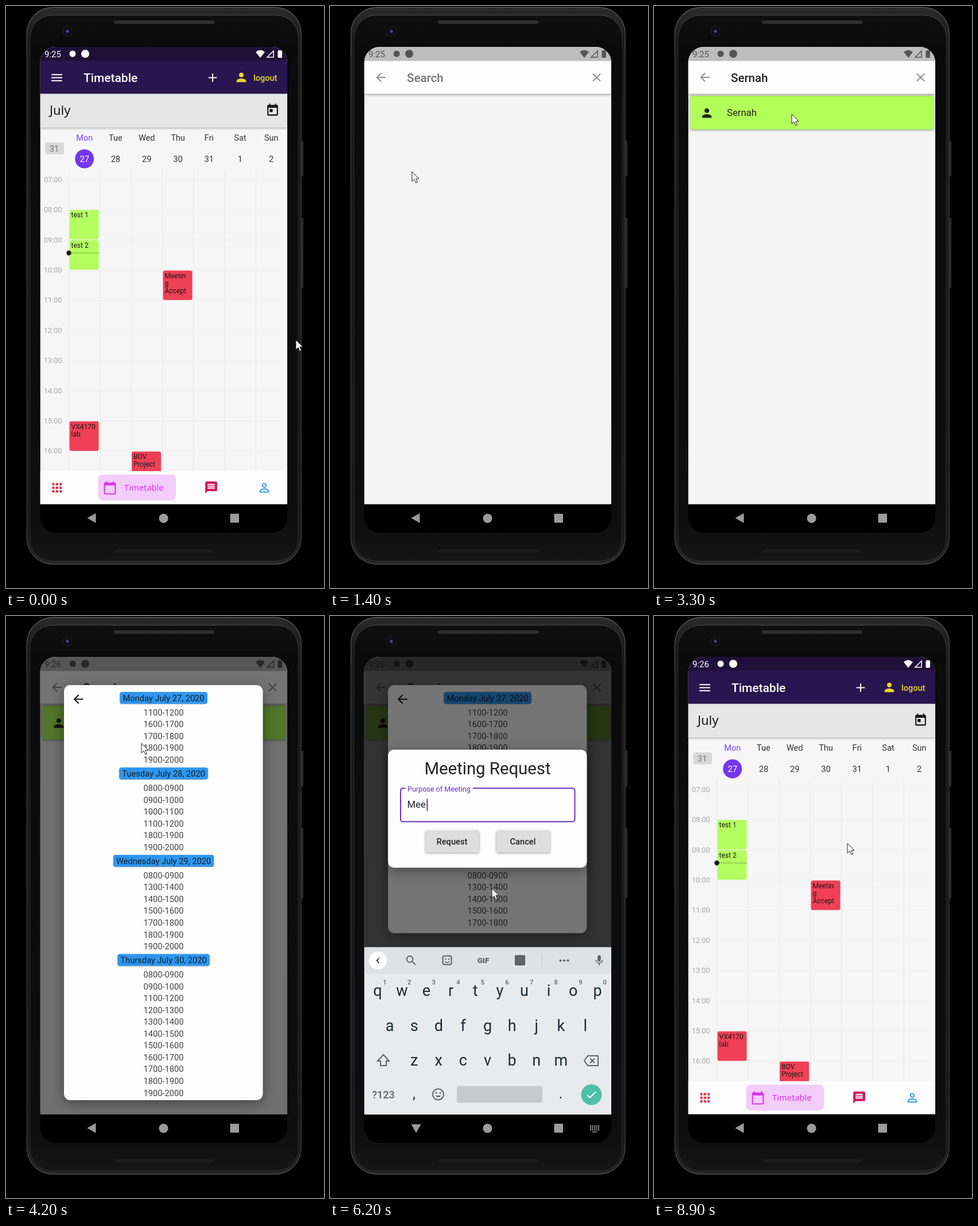
Animation, 554 px wide and 1011 px high, one loop 9 s. Source, as an HTML page with a canvas:

```html
<!DOCTYPE html>
<html lang="en">
<head>
<meta charset="utf-8">
<title>Planner app</title>
<style>
html, body { margin: 0; width: 100%; height: 100%; overflow: hidden; background: #000; }
canvas { display: block; }
</style>
</head>
<body>
<canvas id="stage" width="554" height="1011"></canvas>
<script>
const ctx = document.getElementById('stage').getContext('2d');
const LOOP = 9000, STEP = 100;
const LEFT = 59.5, TOP = 71, WIDTH = 430.5, NAV_TOP = 865.5, MID = 274.5;
const SCRIM = 'rgba(0,0,0,.54)';
let t = 0;

const ICONS = {
  menu: 'M3 18h18v-2H3zm0-5h18v-2H3zm0-7v2h18V6z',
  add: 'M19 13h-6v6h-2v-6H5v-2h6V5h2v6h6z',
  person: 'M12 12c2.2 0 4-1.8 4-4s-1.8-4-4-4-4 1.8-4 4 1.8 4 4 4zm0 2c-2.7 0-8 1.3-8 4v2h16v-2c0-2.7-5.3-4-8-4z',
  personLine: 'M12 5.9a2.1 2.1 0 1 1 0 4.2 2.1 2.1 0 0 1 0-4.2m0 9c3 0 6.1 1.5 6.1 2.1v1.1H5.9V17c0-.6 3.1-2.1 6.1-2.1M12 4a4 4 0 1 0 0 8 4 4 0 0 0 0-8zm0 9c-2.7 0-8 1.3-8 4v3h16v-3c0-2.7-5.3-4-8-4z',
  today: 'M19 3h-1V1h-2v2H8V1H6v2H5a2 2 0 0 0-2 2v14c0 1.1.9 2 2 2h14a2 2 0 0 0 2-2V5a2 2 0 0 0-2-2zm0 16H5V8h14zM7 10h5v5H7z',
  event: 'M19 3h-1V1h-2v2H8V1H6v2H5a2 2 0 0 0-2 2v14c0 1.1.9 2 2 2h14a2 2 0 0 0 2-2V5a2 2 0 0 0-2-2zm0 16H5V8h14zM12 12h5v5h-5z',
  calendar: 'M20 3h-1V1h-2v2H7V1H5v2H4a2 2 0 0 0-2 2v16c0 1.1.9 2 2 2h16a2 2 0 0 0 2-2V5a2 2 0 0 0-2-2zm0 18H4V8h16z',
  people: 'M16 11a3 3 0 1 0-3-3 3 3 0 0 0 3 3zm-8 0a3 3 0 1 0-3-3 3 3 0 0 0 3 3zm0 2c-2.3 0-7 1.2-7 3.5V19h14v-2.5C15 14.2 10.3 13 8 13zm8 0l-1 .05c1.2.8 2 2 2 3.45V19h6v-2.5c0-2.3-4.7-3.5-7-3.5z',
  bell: 'M12 22a2 2 0 0 0 2-2h-4c0 1.1.9 2 2 2zm6-6v-5c0-3.1-1.6-5.6-4.5-6.3V4a1.5 1.5 0 0 0-3 0v.7C7.6 5.4 6 7.9 6 11v5l-2 2v1h16v-1z',
  review: 'M20 2H4a2 2 0 0 0-2 2v18l4-4h14a2 2 0 0 0 2-2V4a2 2 0 0 0-2-2zM6 14v-2.5L13.2 4.5l2.3 2.3L8.5 14zm12 0h-7.5l2-2H18z',
  chat: 'M20 2H4a2 2 0 0 0-2 2v18l4-4h14a2 2 0 0 0 2-2V4a2 2 0 0 0-2-2zm-2 12H6v-2h12zm0-3H6V9h12zm0-3H6V6h12z',
  back: 'M20 11H7.8l5.6-5.6L12 4l-8 8 8 8 1.4-1.4L7.8 13H20z',
  close: 'M19 6.4L17.6 5 12 10.6 6.4 5 5 6.4l5.6 5.6L5 17.6 6.4 19l5.6-5.6 5.6 5.6 1.4-1.4-5.6-5.6z',
  search: 'M15.5 14h-.8l-.3-.3a6.5 6.5 0 1 0-.7.7l.3.3v.8l5 5 1.5-1.5zm-6 0a4.5 4.5 0 1 1 0-9 4.5 4.5 0 0 1 0 9z',
  mic: 'M12 14a3 3 0 0 0 3-3V5a3 3 0 0 0-6 0v6a3 3 0 0 0 3 3zm5.3-3a5.3 5.3 0 0 1-10.6 0H5c0 3.4 2.7 6.2 6 6.7V21h2v-3.3c3.3-.5 6-3.3 6-6.7z',
  check: 'M9 16.2L4.8 12l-1.4 1.4L9 19 21 7l-1.4-1.4z',
  chevron: 'M15.4 7.4L14 6l-6 6 6 6 1.4-1.4L10.8 12z'
};

const ramp = (from, to) => {
  const u = Math.min(1, Math.max(0, (t - from) / (to - from)));
  return u * u * (3 - 2 * u);
};
const during = (from, to) => t >= from && t < to;
const typed = (word, start, gap) => word.slice(0, Math.max(0, Math.floor((t - start) / gap) + 1));

function rect(x, y, w, h, color, radius = 0, blur = 0) {
  ctx.save();
  if (blur) { ctx.shadowColor = 'rgba(0,0,0,.4)'; ctx.shadowBlur = blur; ctx.shadowOffsetY = blur / 4; }
  ctx.fillStyle = color;
  ctx.beginPath();
  ctx.roundRect(x, y, w, h, radius);
  ctx.fill();
  ctx.restore();
}
function frame(x, y, w, h, color, radius, width = 1) {
  ctx.strokeStyle = color;
  ctx.lineWidth = width;
  ctx.beginPath();
  ctx.roundRect(x, y, w, h, radius);
  ctx.stroke();
}
function disc(x, y, r, color) {
  ctx.fillStyle = color;
  ctx.beginPath();
  ctx.arc(x, y, r, 0, 7);
  ctx.fill();
}
function ring(x, y, r, color, width, dash = []) {
  ctx.strokeStyle = color;
  ctx.lineWidth = width;
  ctx.setLineDash(dash);
  ctx.beginPath();
  ctx.arc(x, y, r, 0, 2 * Math.PI);
  ctx.stroke();
  ctx.setLineDash([]);
}
function shape(path, x, y, fill, stroke, width = 1.5) {
  ctx.save();
  ctx.translate(x, y);
  const p = new Path2D(path);
  if (fill) { ctx.fillStyle = fill; ctx.fill(p); }
  if (stroke) { ctx.strokeStyle = stroke; ctx.lineWidth = width; ctx.stroke(p); }
  ctx.restore();
}
function icon(name, x, y, color, size = 25) {
  ctx.save();
  ctx.translate(x - size / 2, y - size / 2);
  ctx.scale(size / 24, size / 24);
  ctx.fillStyle = color;
  ctx.fill(new Path2D(ICONS[name]), 'evenodd');
  ctx.restore();
}
function text(str, x, y, size, color, align = 'left', weight = 400, family = 'Roboto') {
  ctx.font = `${weight} ${size}px "${family}", sans-serif`;
  ctx.textAlign = align;
  ctx.fillStyle = color;
  ctx.fillText(str, x, y);
}
function vertical(...colors) {
  const gradient = ctx.createLinearGradient(0, 0, 0, 970);
  for (const [stop, color] of colors) gradient.addColorStop(stop, color);
  return gradient;
}
const scrim = () => rect(LEFT, TOP, WIDTH, NAV_TOP - TOP, SCRIM);

function drawPhone() {
  rect(0, 0, 554, 1011, '#000');
  for (const [y, h] of [[234, 62], [368, 122]]) rect(514, y, 4, h, '#2c2c2c', 1);
  rect(35.5, 1.5, 479.5, 969, vertical([0, '#2b2b2b'], [.06, '#1b1b1b'], [.94, '#191919'], [1, '#262626']), 46);
  frame(36.5, 2.5, 477.5, 967, vertical([0, '#6a6a6a'], [.1, '#454545'], [.9, '#3c3c3c'], [1, '#585858']), 45);
  rect(42, 16, 467, 948, vertical([0, '#101010'], [.08, '#0a0a0a'], [.92, '#0e0e0e'], [1, '#161616']), 38);
  frame(42, 16, 467, 948, vertical([0, '#555'], [.08, '#242424'], [1, '#2a2a2a']), 38);
  rect(188, 25, 175, 6, '#303030', 3);
  rect(189, 944, 173, 5, '#1c1c1c', 2);
  disc(107, 44, 9, '#1a1a1c');
  disc(107, 44, 7, '#08080b');
  disc(107, 44, 4.5, '#18163a');
  disc(107, 44, 2, '#5451a0');
}

function drawStatus(color) {
  text(t < 3500 ? '9:25' : '9:26', 67, 89, 15, color);
  disc(116, 83, 5.5, color);
  disc(138, 83, 7, color);
  shape('M435 80Q443 73 451 80L443 90Z', 0, 0, color);
  shape('M455 89L466 78V89Z', 0, 0, null, color);
  rect(473.5, 77, 7.5, 13, color, 1.5);
}

function drawEvent(x, y, color, lines) {
  rect(x, y, 51, 51.3, color, 3);
  lines.forEach((line, i) => text(line, x + 3, y + 13 + i * 13.2, 12, '#1a1a1a'));
}

function drawTimetable() {
  rect(LEFT, TOP, WIDTH, 795, '#f6f6f6');
  const column = i => 109 + i * 54.3, hourY = i => 301.3 + i * 52.4;
  for (let i = 0; i < 10; i++) {
    rect(104, hourY(i), 374, 1, '#eee');
    text(String(i + 7).padStart(2, '0') + ':00', 66, hourY(i) + 4.5, 12.57, '#a6a6a6');
  }
  for (let i = 0; i < 7; i++) rect(column(i), 285, 1, 523, '#ececec');
  disc(136.7, 265.5, 16.5, '#7436ef');
  'Mon Tue Wed Thu Fri Sat Sun'.split(' ').forEach((day, i) => {
    const x = 136.7 + i * 54.25;
    text(day, x, 234, 14.5, i ? '#333' : '#7c43f0', 'center');
    text(i < 5 ? 27 + i : i - 4, x, 271, 14.67, i ? '#333' : '#fff', 'center');
  });
  rect(68, 237, 33, 20.5, '#d8d8d8', 2);
  text('31', 84, 252.5, 14.67, '#777', 'center');

  drawEvent(110.5, 354.3, '#b4fc60', ['test 1']);
  drawEvent(110.5, 406.8, '#b4fc60', ['test 2']);
  drawEvent(273.5, 459.5, '#ef4056', ['Meetin', 'g', 'Accept']);
  drawEvent(110.5, 721.5, '#ef4056', ['VX4170', 'lab']);
  drawEvent(219, 774, '#ef4056', ['BOV', 'Project']);
  rect(110, 428.5, 53, 1, 'rgba(0,0,0,.3)');
  disc(109.5, 429, 4.2, '#151515');

  rect(LEFT, 152, WIDTH, 59, '#e6e6e6', 0, 5);
  text('July', 76, 189, 22, '#1c1c1c', 'left', 400, 'Noto Sans');
  icon('today', 464.5, 181, '#111');
  rect(LEFT, TOP, WIDTH, 24.5, '#201038');
  rect(LEFT, 95, WIDTH, 57.5, '#29154f');
  icon('menu', 88.5, 124.5, '#fff');
  text('Timetable', 135, 132, 20.95, '#fff', 'left', 500);
  icon('add', 360, 124.5, '#fff');
  icon('person', 410, 124, '#e6d72b');
  text('logout', 431, 129.5, 14.5, '#e6d72b', 'left', 500);

  rect(LEFT, 808, WIDTH, 58, '#fdfdfd');
  for (let i = 0; i < 9; i++) rect(80.5 + i % 3 * 6.3, 828.5 + Math.floor(i / 3) * 6.3, 4.2, 4.2, '#df3a4b');
  rect(160.5, 814, 135.5, 45, '#f2cdfa', 8);
  icon('calendar', 181, 837, '#d537ee');
  text('Timetable', 206, 842, 14.67, '#d537ee', 'left', 400, 'Noto Sans');
  icon('chat', 357.5, 836.5, '#d0185f');
  icon('personLine', 450, 837, '#3b9bdd');
}

function drawDrawer(open) {
  if (open <= 0) return;
  ctx.save();
  ctx.globalAlpha = open;
  scrim();
  ctx.globalAlpha = 1;
  ctx.translate(-316 * (1 - open), 0);
  rect(LEFT, TOP, 316, 795, '#f5f5f5', 0, 18);
  rect(LEFT, TOP, 316, 24.5, '#bababa');
  rect(LEFT, 95.5, 316, 165, '#f6a945');
  disc(217, 181, 54, '#5b0ae0');
  ['Meet', 'Notifications', 'Review', 'Events', 'Settings'].forEach((label, i) => {
    const y = 295 + i * 51.3;
    const name = ['people', 'bell', 'review', 'event'][i];
    if (name) icon(name, 78, y, '#1d1d1d');
    else {
      ring(78, y, 6, '#1d1d1d', 4.5);
      ring(78, y, 9, '#1d1d1d', 3, [4.7, 4.725]);
    }
    text(label, 111, y + 7.5, 20.95, '#222');
  });
  text('0', 335, 354, 20.95, '#b0123c');
  ctx.restore();
}

function drawSearch() {
  rect(LEFT, TOP, WIDTH, 795, '#f5f5f5');
  if (t >= 3000) {
    rect(63.5, 156, 423.5, 58.5, '#b2ff59', 3, 4);
    icon('person', 92, 186, '#222');
    text('Sernah', 127, 191, 16.76, '#222');
  }
  rect(LEFT, 95, WIDTH, 57.5, '#fefefe', 0, 5);
  rect(LEFT, TOP, WIDTH, 24.5, '#bdbdbd');
  icon('back', 88.5, 124, '#919191');
  icon('close', 464.5, 124, '#919191');
  const query = typed('Sernah', 2200, 120);
  text(query || 'Search', 134, 132, 20.5, query ? '#222' : '#757575', 'left', 500);
  drawStatus('#555');
}

const AGENDA = [
  ['Monday July 27, 2020', [11, 16, 17, 18, 19]],
  ['Tuesday July 28, 2020', [8, 9, 10, 11, 18, 19]],
  ['Wednesday July 29, 2020', [8, 13, 14, 15, 17, 18, 19]],
  ['Thursday July 30, 2020', [8, 9, 11, 12, 13, 14, 15, 16, 17, 18, 19]]
];
const clock = hour => String(hour).padStart(2, '0') + '00';

function drawAgenda(keyboard) {
  const height = 721 - 290 * keyboard;
  rect(101, 120, 346.5, height, '#fdfdfd', 11, 22);
  ctx.save();
  ctx.beginPath();
  ctx.rect(101, 120, 346.5, height - 7);
  ctx.clip();
  icon('back', 126, 144.5, '#111');
  let y = 142.5;
  for (const [day, hours] of AGENDA) {
    ctx.font = '400 14.67px "Roboto", sans-serif';
    const w = ctx.measureText(day).width + 10;
    rect(MID - w / 2, y - 10.5, w, 20.5, '#2d96ee', 4, 2);
    text(day, MID, y + 5.3, 14.67, '#10202e', 'center');
    y += 25;
    for (const hour of hours) {
      text(`${clock(hour)}-${clock(hour + 1)}`, MID, y + 5.3, 14.67, '#444', 'center');
      y += 20.55;
    }
    y += 3.45;
  }
  ctx.restore();
}

function drawRequest(keyboard) {
  ctx.save();
  ctx.translate(0, -145.2 * keyboard);
  rect(101, 377.5, 346.5, 205, '#fdfdfd', 10, 22);
  text('Meeting Request', MID, 420, 29.33, '#222', 'center');
  const focused = t >= 5500;
  if (focused) {
    frame(123, 444.5, 303.5, 58, '#6a30c8', 4, 2);
    rect(131, 441, 118, 6, '#fdfdfd');
    text('Purpose of Meeting', 135, 450, 12.57, '#6a30c8');
    const message = typed('Meeting up?', 6000, 85);
    text(message, 134.5, 478.5, 16.76, '#222');
    if (during(5500, 7600) && t % 1000 < 500) {
      rect(136 + ctx.measureText(message).width, 463, 2, 21, '#6a30c8');
    }
  } else {
    frame(122.5, 444, 304.5, 59.5, '#9a9a9a', 4);
    text('Purpose of Meeting', 134.5, 479.5, 16.76, '#777');
  }
  const pressed = during(7600, 7900);
  rect(166.5, 518.5, 93, 37.5, pressed ? '#d2d2d2' : '#dedede', 2, pressed ? 8 : 4);
  if (pressed) {
    ctx.save();
    ctx.beginPath();
    ctx.rect(166.5, 518.5, 93, 37.5);
    ctx.clip();
    disc(240, 538, 21, '#bdbdbd');
    ctx.restore();
  }
  rect(290, 518.5, 93, 37.5, '#dedede', 2, 4);
  text('Request', 212.5, 542, 14.67, '#222', 'center', 500);
  text('Cancel', 336, 542, 14.67, '#222', 'center', 500);
  ctx.restore();
}

function drawKeyboard(open, action) {
  if (open <= 0) return;
  const gray = '#5f6368', ink = '#1c2c35', pitch = 42.6;
  ctx.save();
  ctx.beginPath();
  ctx.rect(LEFT, TOP, WIDTH, 796.5);
  ctx.clip();
  ctx.translate(0, 291 * (1 - open));
  rect(LEFT, 575.5, WIDTH, 290.5, '#e8eaee');
  rect(LEFT, 575.5, WIDTH, 46, '#dfe1e5');
  disc(83.5, 598.5, 15.5, '#fff');
  icon('chevron', 83.5, 598.5, '#333', 20);
  icon('search', 141.5, 598.5, gray, 23);
  frame(196.5, 590.5, 15, 15, gray, 3, 2);
  disc(201.5, 596, 1.3, gray);
  disc(207, 596, 1.3, gray);
  shape('M-4 0Q0 4 4 0', 204, 600, null, gray);
  text('GIF', 267, 603, 13.5, gray, 'center', 900);
  rect(322, 589, 18, 18, gray, 2);
  rect(369, 587, 1, 22, '#c8cbd0');
  for (let i = -1; i < 2; i++) disc(408 + i * 6.5, 598.5, 2, gray);
  icon('mic', 469, 598.5, gray, 22);

  const row = (letters, y) => [...letters].forEach((c, i) =>
    text(c, MID + (i - (letters.length - 1) / 2) * pitch, y, 27, ink, 'center'));
  row('qwertyuiop', 660);
  row('asdfghjkl', 720.5);
  row('zxcvbnm', 781);
  for (let i = 0; i < 10; i++) text((i + 1) % 10, 95.5 + i * pitch, 640, 11, gray, 'center', 500);
  shape('M0-10L10 1H5V9H-5V1H-10Z', 93, 772, null, gray, 2);
  shape('M-13 0L-7-8.5H11V8.5H-7ZM-3-4L5 4M5-4L-3 4', 456, 772.5, null, gray, 2);
  text('?123', 93, 838, 18, gray, 'center', 500);
  text(',', 146.5, 838, 25, ink, 'center');
  ring(188.5, 831, 9.5, gray, 2);
  disc(185, 828.5, 1.5, gray);
  disc(192, 828.5, 1.5, gray);
  shape('M-5 0Q0 6 5 0Z', 188.5, 833, gray);
  rect(221, 816.5, 149, 29, '#c6c9cd', 4);
  text('.', 402, 838, 25, ink, 'center');
  disc(455.5, 831.5, 18, '#50bfa8');
  icon(action, 455.5, 831.5, '#fff', 22);
  ctx.restore();
}

function drawNavBar(keyboard) {
  const gray = '#9b9b9b';
  rect(LEFT, NAV_TOP, WIDTH, 49.5, '#000');
  const turn = t >= 7600 ? 90 - 270 * Math.min(1, (t - 7600) / 280) : 180 - 90 * keyboard;
  ctx.save();
  ctx.translate(150, 889.5);
  ctx.rotate(turn * Math.PI / 180);
  shape('M8.5 0L-6.5-8.5V8.5Z', 0, 0, gray);
  ctx.restore();
  disc(274.5, 890, 8, gray);
  rect(390.5, 882, 15.5, 15.5, gray, 1);
  if (keyboard > .9 && t < 7600) {
    for (let i = 0; i < 15; i++) rect(453 + i % 5 * 3.5, 885 + Math.floor(i / 5) * 3.3, 2.2, 2.2, gray);
    rect(457, 895.5, 8, 1.5, gray);
  }
}

// Time, then the pointer tip at that time.
const POINTER = [
  [0, 505, 580], [500, 88, 124], [700, 88, 124], [900, 173, 170], [1200, 140, 297],
  [1350, 140, 297], [1700, 190, 130], [3000, 190, 130], [3300, 240, 188], [3600, 240, 188],
  [4200, 236, 221], [4900, 270, 230], [5300, 282, 473], [7100, 282, 473],
  [7600, 246, 391], [7800, 246, 391], [8100, 88, 124], [8400, 88, 124], [8800, 337, 395], [9000, 337, 395]
];
function drawPointer() {
  const i = POINTER.findIndex(p => p[0] > t);
  const [t0, x0, y0] = POINTER[i - 1], [t1, x1, y1] = POINTER[i];
  const u = ramp(t0, t1);
  shape('M0 0V17L4 13.3L6.7 19.5L9.5 18.3L6.8 12.2H12Z', x0 + (x1 - x0) * u, y0 + (y1 - y0) * u, '#fff', '#222', 1);
}

function withFade(alpha, draw) {
  if (alpha <= 0) return;
  ctx.save();
  ctx.globalAlpha = alpha;
  scrim();
  draw();
  ctx.restore();
}

function drawScreen() {
  const closing = Math.min(1, Math.max(0, (t - 7657) / 243)) ** 3;
  const keyboard = ramp(1400, 1700) - ramp(2900, 3150) + ramp(5450, 5750) - closing;
  ctx.save();
  ctx.beginPath();
  ctx.roundRect(LEFT, TOP, WIDTH, 844, 27);
  ctx.clip();
  if (during(1350, 8350)) {
    drawSearch();
    withFade(ramp(3600, 3800) - ramp(7800, 8000), () => drawAgenda(t > 5000 ? keyboard : 0));
    withFade(ramp(4900, 5100) - ramp(7750, 7950), () => drawRequest(keyboard));
  } else {
    drawTimetable();
    drawDrawer(t < 1350 ? ramp(650, 880) : 1 - ramp(8500, 8850));
    drawStatus('#fff');
  }
  drawNavBar(keyboard);
  drawKeyboard(keyboard, t < 4000 ? 'search' : 'check');
  ctx.restore();
}

function render() {
  t = Math.floor(performance.now() % LOOP / STEP) * STEP;
  drawPhone();
  drawScreen();
  drawPointer();
  requestAnimationFrame(render);
}
render();
</script>
</body>
</html>
```
